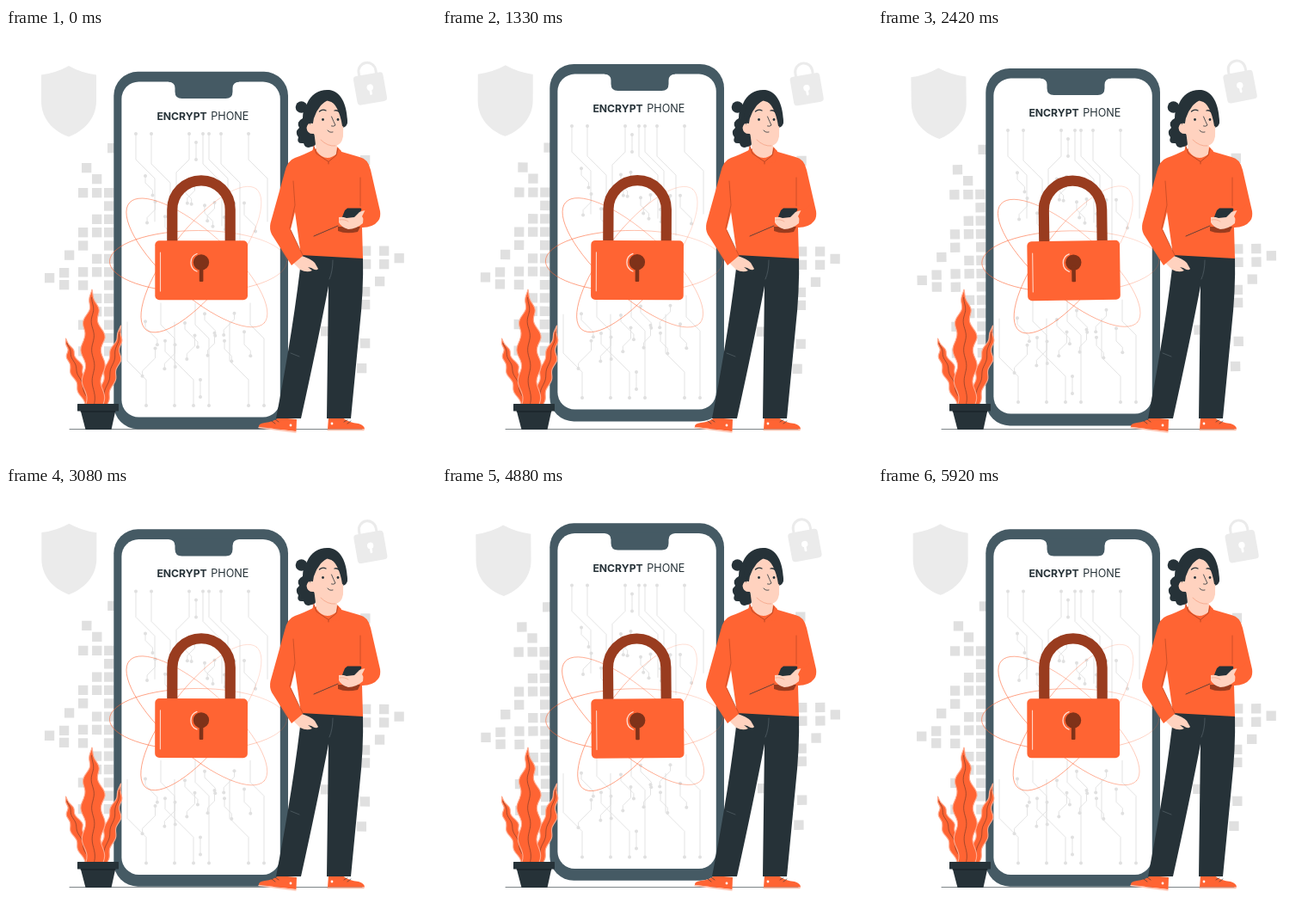
An HTML page with a canvas for the animation above (5.96 s loop, 500 by 500 pixels).

```html
<!DOCTYPE html>
<html lang="en">
<head>
<meta charset="utf-8">
<title>Encrypt phone</title>
<style>
html, body { margin: 0; width: 100%; height: 100%; overflow: hidden; background: #fff; }
canvas { display: block; width: 500px; height: 500px; }
</style>
</head>
<body>
<canvas id="stage"></canvas>
<script>
const canvas = document.getElementById('stage');
const ctx = canvas.getContext('2d');
const ratio = window.devicePixelRatio || 1;
canvas.width = canvas.height = 500 * ratio;

const LOOP = 5960, FPS = 24;
const ORANGE = '#ff6433', DARK = '#263238', SLATE = '#455a64', RUST = '#993c1f',
  SKIN = '#ffd2bf', PALE = '#ebebeb', GREY = '#e0e0e0', CREASE = '#b94723';

function fill(d, color) {
  ctx.fillStyle = color;
  ctx.fill(new Path2D(d));
}

function line(d, color = DARK, width = 0.8) {
  ctx.strokeStyle = color;
  ctx.lineWidth = width;
  ctx.lineCap = ctx.lineJoin = 'round';
  ctx.stroke(new Path2D(d));
}

function dot(x, y, r, color) {
  ctx.fillStyle = color;
  ctx.beginPath();
  ctx.arc(x, y, r, 0, 7);
  ctx.fill();
}

function box(x, y, w, h, r, color) {
  ctx.fillStyle = color;
  ctx.beginPath();
  ctx.roundRect(x, y, w, h, r);
  ctx.fill();
}

function swayed(angle, draw) {
  ctx.save();
  ctx.translate(250, 250);
  ctx.rotate(angle);
  ctx.translate(-250, -250);
  draw();
  ctx.restore();
}

function seeded(seed) {
  return () => (seed = seed * 16807 % 2147483647) / 2147483647;
}

function tile(x, y) {
  box(x, y, 11.3, 11.3, 0, GREY);
}

// Dense columns beside the phone, then loose tiles further out
function tiles() {
  for (let row = 0; row < 13; row++) {
    const y = 186 + row * 15.35;
    tile(114, y);
    if (row % 3 !== 1 && row < 10) tile(100, y);
    if (row % 3 !== 2 && row !== 1 && row !== 9) tile(84, y);
  }
  for (const x of [413, 434])
    for (const y of [253.5, 269]) tile(x, y);
  for (const y of [148, 301, 316, 361]) tile(412, y);
  for (const y of [279, 293]) tile(62, y);
  for (const [x, y] of [[45, 285], [68, 258.5], [88, 157], [100, 170], [118, 134],
    [366, 347], [408, 390], [429, 289], [451.5, 262]]) tile(x, y);
}

function backdrop() {
  tiles();
  fill('M41 54.5Q59 52 73 44Q87 52 105 54.5V85C105 107 88 121 73 126.5C57 121 41 107 41 85Z', PALE);
  ctx.save();
  ctx.translate(423.5, 70.5);
  ctx.rotate(-Math.PI / 18);
  line('M-10-16V-20.5A10 10 0 0 1 10-20.5V-16', PALE, 3);
  box(-17.5, -17, 35, 34, 4, PALE);
  dot(0, -1.5, 3.7, '#fff');
  line('M0 0V6', '#fff', 2.8);
  ctx.restore();
}

// A trace runs straight, jogs at 45 degrees and runs on
function trace(x, y, run, jog, rest) {
  const step = Math.sign(run) * Math.abs(jog);
  line(`M${x} ${y}v${run}l${jog} ${step}v${rest}`, GREY, 0.9);
  dot(x, y, 2, GREY);
  return [x + jog, y + run + step + rest];
}

function circuits() {
  [151, 169, 213, 229, 236, 250, 282].forEach((x, i) =>
    trace(x, 123, 30 + i % 2 * 5, i === 2 ? -15 : 22, 50 + i % 3 * 10));
  [163, 196, 218, 236, 282, 300].forEach((x, i) =>
    trace(x, 439, i % 2 ? -78 : -30, i % 2 ? -16 : -22, i % 2 ? -25 : -45));
  const rand = seeded(77);
  for (let i = 0; i < 11; i++) {
    const x = 162 + i * 11.5, side = i % 2 ? -1 : 1;
    for (const top of [172, 326]) {
      const end = trace(x, top + rand() * 48, 7 + rand() * 8, side * (7 + rand() * 8), 6);
      dot(...end, 2, GREY);
    }
  }
  for (const [x, y] of [[221, 133], [226, 409]])
    dot(...trace(x, y, 10, 0, 10), 2, GREY);
}

function phone(lift) {
  ctx.save();
  ctx.translate(0, lift);
  box(125.3, 50.8, 202.7, 415.5, 28, SLATE);
  box(134.4, 62.5, 184.4, 390, 20, '#fff');
  fill('M189 62H271V62.500Q263.500 63 263.500 70V74Q263.500 82 255.500 82H204.500Q196.500 82 196.500 74V70Q196.500 63 189 62.500Z', SLATE);
  circuits();
  ctx.fillStyle = DARK;
  ctx.font = '700 12.2px Inter, "Open Sans", sans-serif';
  ctx.fillText('ENCRYPT', 175.4, 107);
  ctx.font = '400 12.6px Inter, "Open Sans", sans-serif';
  ctx.fillText('PHONE', 238.3, 107);
  ctx.restore();
}

function ring(x, y, a, b, degrees) {
  const fade = ctx.createLinearGradient(200, 300, 300, 240);
  fade.addColorStop(0, ORANGE);
  fade.addColorStop(1, 'rgba(255,100,51,0.35)');
  ctx.strokeStyle = fade;
  ctx.lineWidth = 0.6;
  ctx.beginPath();
  ctx.ellipse(x, y, a, b, degrees * Math.PI / 180, 0, 2 * Math.PI);
  ctx.stroke();
}

function padlock() {
  ring(223.5, 271.5, 103, 36, 0);
  ring(222, 273, 105, 36.5, 41.7);
  ring(227, 269, 104, 36, -52);
  ctx.lineCap = 'butt';
  ctx.strokeStyle = RUST;
  ctx.lineWidth = 12.2;
  ctx.stroke(new Path2D('M193.300 249V211A33.700 33.700 0 0 1 260.700 211V249'));
  box(173.3, 247.2, 107.7, 69, 5, ORANGE);
  line('M179.500 261V306', '#ffd5c6', 1.1);
  line('M222 262.500A11 11 0 0 0 222 283', '#ffe0d5', 1.3);
  dot(227, 272.4, 9.2, '#7f3219');
  box(224.8, 276, 4.6, 19, 1, '#7f3219');
}

// Wavy leaf from tip to root
function leaf(tip, bend, root, half, waves) {
  const left = [], right = [], mid = [], n = 48;
  for (let i = 0; i <= n; i++) {
    const u = i / n, v = 1 - u;
    const at = k => v * v * tip[k] + 2 * u * v * bend[k] + u * u * root[k];
    const x = at(0), y = at(1);
    const w = half * Math.min(1, u * 2.2) * (1 - 0.2 * u * u);
    const wave = -Math.sin(u * waves * 2 * Math.PI) * half * 0.2 * Math.min(1, u * 5);
    left.push([x - w + wave, y]);
    right.unshift([x + w + wave, y]);
    if (i > 3) mid.push([x + wave * 0.6, y]);
  }
  const path = pts => 'M' + pts.map(p => p.map(c => c.toFixed(2)).join(' ')).join('L');
  const shape = path([...left, ...right]) + 'Z';
  fill(shape, ORANGE);
  line(shape, '#ffab90', 1.1);
  line(path(mid), '#6b3426', 0.6);
}

function plant() {
  leaf([69.5, 361], [80, 393], [98, 440], 7.5, 4);
  leaf([133.5, 346], [126, 390], [110, 440], 7.5, 4);
  leaf([100, 304], [101, 360], [102, 440], 12.5, 4);
  fill('M86.500 444H127.500L122.500 467H92.500Z', DARK);
  box(83, 437, 48, 8.5, 0.5, DARK);
  line('M87 446H127', '#11191d', 0.8);
}

function shoes() {
  fill('M317 453L338 455L337.500 469L294 464Q293 460 301 459Q311 458 317 453Z', ORANGE);
  line('M294 464.500L337 470', '#ffc1ad', 1.4);
  line('M309 457L313 460M313 455L317 458', DARK, 0.6);
  fill('M375 453H391Q399 459 410 460Q417 462 417 466.500H374Z', ORANGE);
  line('M374 467.500H416', '#ffc1ad', 1.4);
  line('M393 458L397 455.500M397 460L401 457', DARK, 0.6);
  dot(379, 460, 1.4, '#fff');
  dot(331, 462, 1.4, '#fff');
}

function body() {
  fill('M344 262L415 266Q416 305 411 350L401 454H373L375 300Q362 368 343 454H314Q335 345 344 262Z', DARK);
  line('M380 270Q380 283 376 292M331 378L341 382', '#56636a', 0.7);
  // Hand in the pocket
  fill('M334 273L344 265Q354 268 359 273L363 280Q361 283 355 279L351 278L356 282Q350 285 342 281Z', SKIN);
  // Shirt and sleeves
  fill('M361 140Q345 148 336 151Q327 154 324 168L307.500 227Q306 234 309 240L332 276L345 265L331 234L336 214L343 264L415 268L414 232Q427 232 433 224Q436 220 435 213L424 165Q421 152 411 150L387 143Z', ORANGE);
  line('M330 233L336 206L334 178M345 264L331 235M412 174V207', CREASE, 0.7);
}

function head() {
  dot(343.5, 92, 6.8, DARK);
  fill('M350 88C355 76 365 71 376 72C389 74 396 87 397 108Q397 113 394 115L360 128Q362 138 355 138Q348 141 346 134Q337 135 340 127Q335 121 341 116Q337 109 345 105Q345 94 350 88Z', DARK);
  // Neck, ear and face
  fill('M358 120L361 143Q372 158 386 145L384 130Z', SKIN);
  fill('M359 112Q351 108 349.500 116Q350 124 359 123Z', SKIN);
  fill('M356.500 113Q358 96 372 84Q386 87 391 99Q393 112 392 126Q390 138 380 137Q366 135 358 123Z', SKIN);
  // Parted fringe
  fill('M354 113C354 96 365 90 377 82Q369 76 357 87Q348 99 354 113Z', DARK);
  fill('M374 83Q387 88 391 114Q395 116 397 110Q394 85 379 78Z', DARK);
  line('M364.500 97Q368 94 372 96M382 96Q385 95 388 98', DARK, 1.3);
  dot(368.5, 106.5, 1.4, DARK);
  dot(386, 106.5, 1.4, DARK);
  line('M378.500 103Q381 109 383 113Q381 115 378.500 114M374 119Q376 122 380 121', DARK, 0.8);
  line('M366 130Q374 138 383 137', '#f29b7d', 0.7);
  // Collar
  fill('M358 136L361 146L375 156L371 159L356 144Z', ORANGE);
  fill('M385 138L390 143L387 156L376 157L384 148Z', ORANGE);
  line('M358 138L361 146L375 155.500L384 148L386 140M375 156V158', '#9f3c1e', 0.7);
}

function handset() {
  fill('M386 231L412 231L409 237Q395 240 386 236Z', RUST);
  line('M358 242L386 230', DARK, 0.7);
  fill('M397 209.500H412Q414 210 413 212L405 228L388 227L394 212Z', DARK);
  fill('M387 220Q391 219 396 221L405 220L411 214Q417 211 420 213L416 219L415 227Q407 234 398 234Q389 231 387 226Z', SKIN);
  line('M388 223Q394 222 398 225', '#ef9a7d', 0.6);
  fill('M418 211Q424 211 429 204L435 215Q434 228 413 232Q418 224 414 219Z', ORANGE);
}

function render(ms) {
  const frame = Math.min(142, Math.floor((ms % LOOP + 4) * FPS / 1000));
  const p = frame / FPS % 3 / 3;
  const lift = -10 * (1 - Math.abs(1 - 2 * p));
  const turn = p < 0.25 ? 4 * p : p < 0.75 ? 2 - 4 * p : 4 * p - 4;
  const angle = turn * Math.PI / 180;

  ctx.setTransform(ratio, 0, 0, ratio, 0, 0);
  ctx.fillStyle = '#fff';
  ctx.fillRect(0, 0, 500, 500);
  swayed(angle, backdrop);
  phone(lift);
  swayed(angle, padlock);
  line('M74 466.500H414', DARK, 0.6);
  plant();
  shoes();
  body();
  head();
  handset();
}

function tick() {
  render(performance.now());
  requestAnimationFrame(tick);
}
tick();
</script>
</body>
</html>
```
